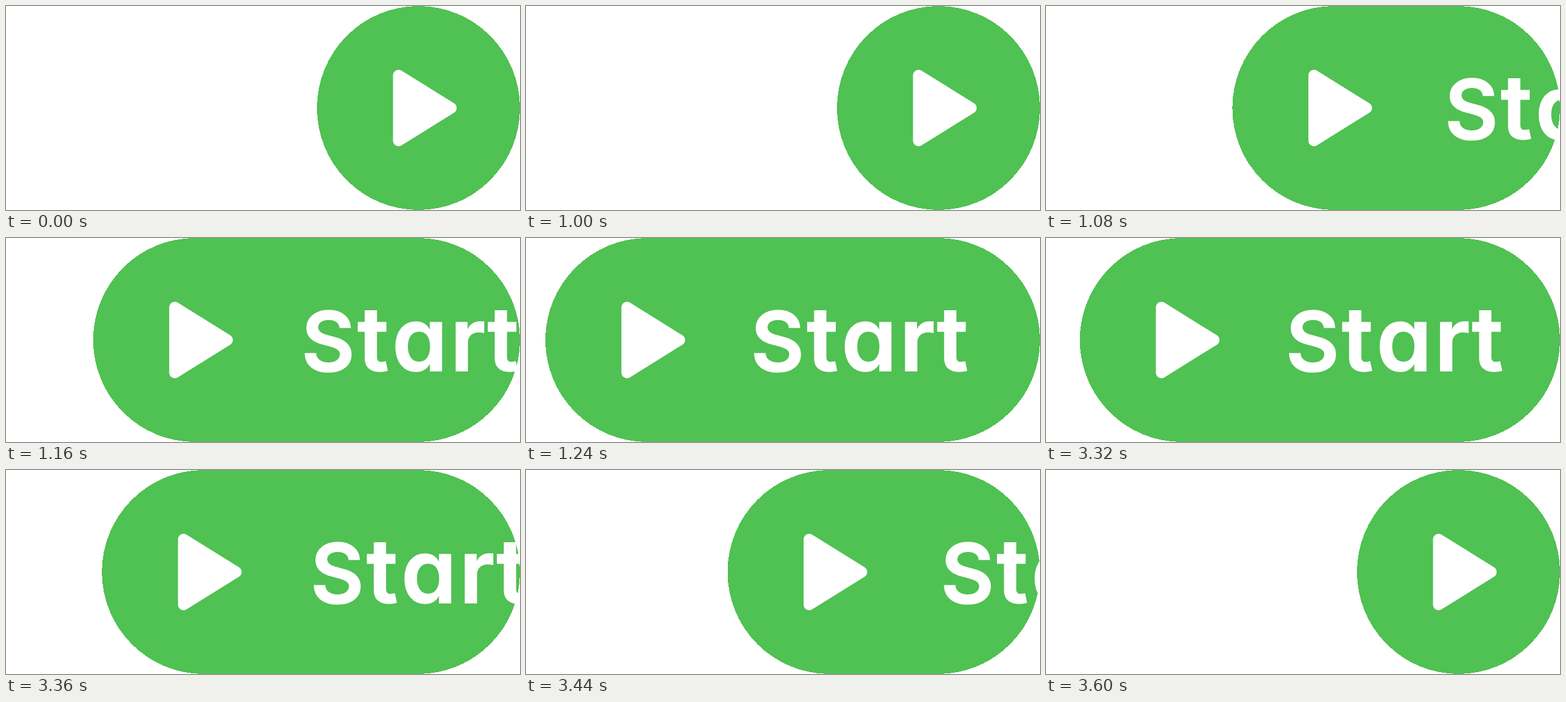
An HTML page that plays this animation: 848 px wide and 336 px high, repeating every 4600 ms.

```html
<!DOCTYPE html>
<html lang="en">
<head>
<meta charset="utf-8">
<title>Start button</title>
<style>
  html, body { margin: 0; width: 100%; height: 100%; overflow: hidden; background: #fff; }
  svg { display: block; width: 848px; height: 336px; }
  text {
    font: 600 147px Inter, "Open Sans", sans-serif;
    font-feature-settings: "cv11";
    font-optical-sizing: none;
    fill: #fff;
    stroke: #fff;
    stroke-width: 1.6px;
  }
  .cap { font-size: 136px; }
</style>
</head>
<body>
<svg viewBox="0 0 848 336">
  <rect id="pill" height="336" rx="168" ry="168" fill="#50c153" shape-rendering="crispEdges"/>
  <path id="play" d="M134.5 114L221.5 168L134.5 222Z" fill="#fff" stroke="#fff" stroke-width="18" stroke-linejoin="round"/>
  <text id="label" x="337.5 430 487 583 644.5" y="219"><tspan class="cap">S</tspan>tart</text>
</svg>
<script>
  const LOOP = 4600, STEP = 40, DURATION = 300;
  const OPEN_AT = 1000, CLOSE_AT = 3300;
  const STAGE = 848, CLOSED_X = 513, LABEL_SPEED = 1.042;
  const [pill, play, label] = ["pill", "play", "label"].map(id => document.getElementById(id));

  // cubic-bezier(0, 0, .58, 1), solved for x by bisection
  function easeOut(x) {
    if (x <= 0) return 0;
    if (x >= 1) return 1;
    let lo = 0, hi = 1;
    for (let i = 0; i < 30; i++) {
      const s = (lo + hi) / 2;
      if (1.74 * s * s * (1 - s) + s * s * s < x) lo = s; else hi = s;
    }
    return lo * lo * (3 - 2 * lo);
  }

  const progress = (t, start) => easeOut((t - start) / DURATION);
  const shift = (el, x) => el.setAttribute("transform", `translate(${x.toFixed(2)} 0)`);

  function draw(ms) {
    const t = Math.floor((ms % LOOP) / STEP) * STEP;
    const x = CLOSED_X * (1 - progress(t, OPEN_AT) + progress(t, CLOSE_AT));
    pill.setAttribute("x", x);
    pill.setAttribute("width", STAGE - x);
    shift(play, x);
    shift(label, x * LABEL_SPEED);
  }

  const began = performance.now();
  function tick() {
    draw(performance.now() - began);
    requestAnimationFrame(tick);
  }
  tick();
</script>
</body>
</html>
```
